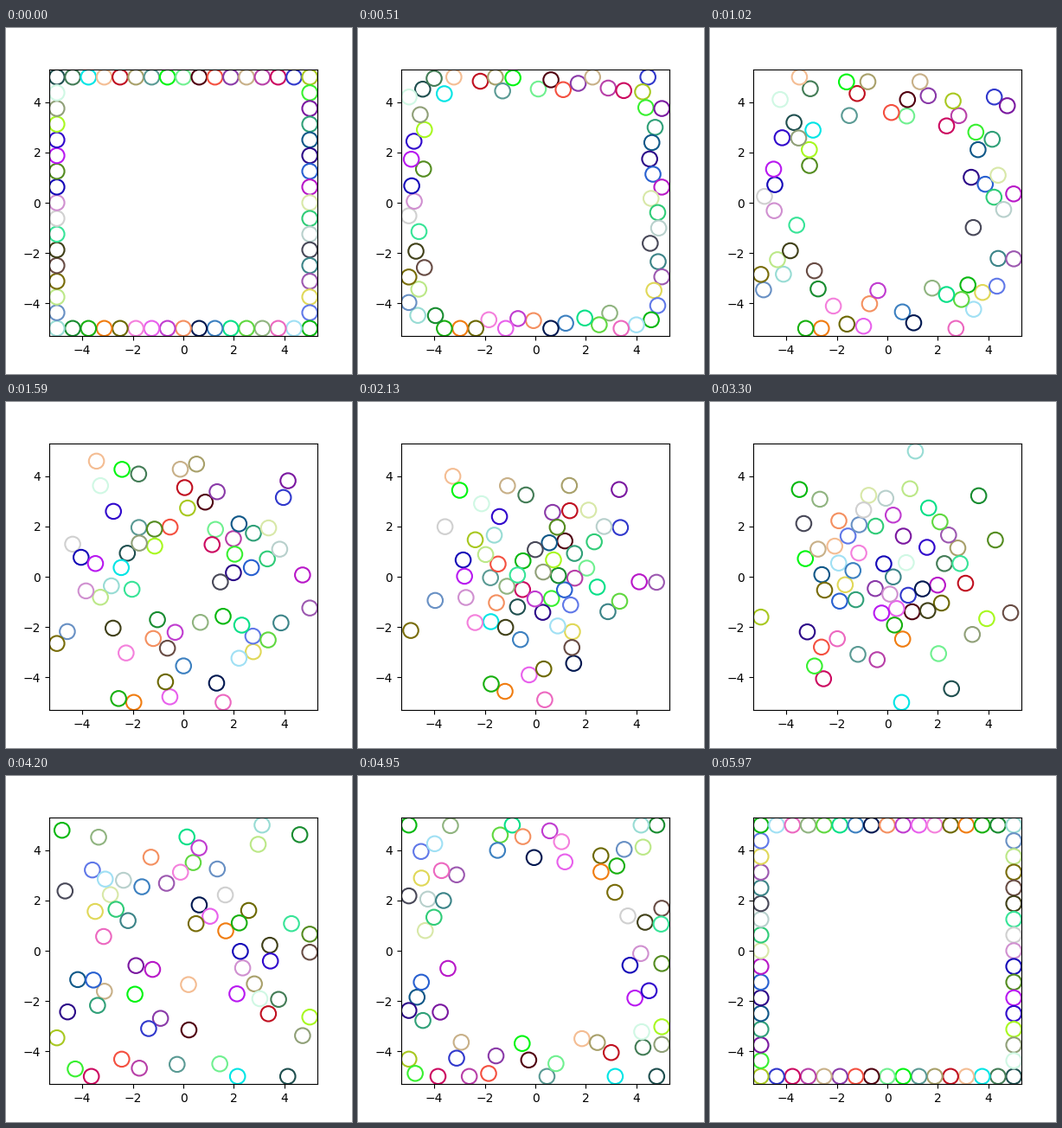
Recreate the animation shown at these times as a matplotlib script. Size 400x400 px, loop 6 s.

```python
import numpy as np
import matplotlib.pyplot as plt
from matplotlib.animation import FuncAnimation
from matplotlib.collections import EllipseCollection

FRAMES = 200
PER_SIDE = 16
HALF, RADIUS = 5.0, 0.3
GAP = 0.62       # least distance between two centres
LEAD = 5.0       # how far agents run ahead of or behind the pack
SWAY = 3.6       # largest sideways bend of a path

# Clockwise from the top left corner, one row per side.
COLORS = (
    "#1f4f4f #437c56 #00e5e5 #f4bd93 #c01020 #a8a06a #5a9a94 #00f510 "
    "#70f090 #500010 #f45040 #8a3aa8 #c8b088 #b840a8 #cc0860 #3038cc "

    "#a8c820 #38f030 #7a18a0 #30a078 #105888 #2c0888 #2860d0 #b818c8 "
    "#d8e8a8 #30cc78 #b8d0cc #484858 #3c8488 #9c58b0 #e0d858 #6078e8 "

    "#08b810 #a0e0f4 #ec68c0 #90b480 #60d840 #08e088 #3c80c0 #001850 "
    "#f49060 #c03cd0 #e860ec #f480dc #6c6800 #f07c10 #18b010 #188c30 "

    "#98dcd4 #6890c4 #bce888 #786c08 #684c44 #404018 #38e498 #d0d0d0 "
    "#d090d0 #1408b8 #548c20 #b818f0 #3008cc #a8f820 #90a078 #d0f8e4"
).split()


def perimeter():
    """Evenly spaced points clockwise round the square."""
    s = -HALF + 2 * HALF * np.arange(PER_SIDE) / PER_SIDE
    edge = np.full(PER_SIDE, HALF)
    sides = [(s, edge), (edge, -s), (-s, -edge), (-edge, s)]
    return np.vstack([np.column_stack(side) for side in sides])


def swap_paths(start, rng):
    """Everyone crosses to the opposite point, at their own pace and bend."""
    t = np.linspace(0, 1, FRAMES)[:, None]
    bump = 16 * (t * (1 - t)) ** 2
    lead = rng.uniform(-LEAD, LEAD, len(start)) / 16
    sway = rng.uniform(-SWAY, SWAY, len(start))
    done = t * t * (3 - 2 * t) + lead * bump
    side = np.column_stack([start[:, 1], -start[:, 0]])
    side /= np.linalg.norm(side, axis=1, keepdims=True)
    return (1 - 2 * done)[..., None] * start + (sway * bump)[..., None] * side


def push_apart(path):
    """Step for each agent away from those that come too close."""
    diff = path[:, :, None] - path[:, None]
    dist = np.hypot(diff[..., 0], diff[..., 1]) + 1e-6
    overlap = np.clip(GAP - dist, 0, None)
    return 0.5 * np.einsum("fij,fijk->fik", overlap / dist, diff)


def smooth(step, passes=3):
    """Spread a step over nearby frames, with both ends held still."""
    for _ in range(passes):
        step[1:-1] = (step[:-2] + 2 * step[1:-1] + step[2:]) / 4
        step[[0, -1]] = 0
    return step


start = perimeter()
path = swap_paths(start, np.random.default_rng(4))
for _ in range(40):
    path = np.clip(path + smooth(push_apart(path)), -HALF, HALF)

fig, ax = plt.subplots(figsize=(4, 4), dpi=100)
size = np.full(len(start), 2 * RADIUS)
rings = EllipseCollection(size, size, np.zeros(len(start)), units="xy",
                          offsets=start, offset_transform=ax.transData,
                          facecolors="none", edgecolors=COLORS, linewidths=1.5)
ax.add_collection(rings)
limit = HALF + RADIUS
ax.set(xlim=(-limit, limit), ylim=(-limit, limit))


def update(frame):
    rings.set_offsets(path[frame])
    return [rings]


anim = FuncAnimation(fig, update, frames=FRAMES, interval=30,
                     repeat=True, repeat_delay=0)
plt.show()
```
